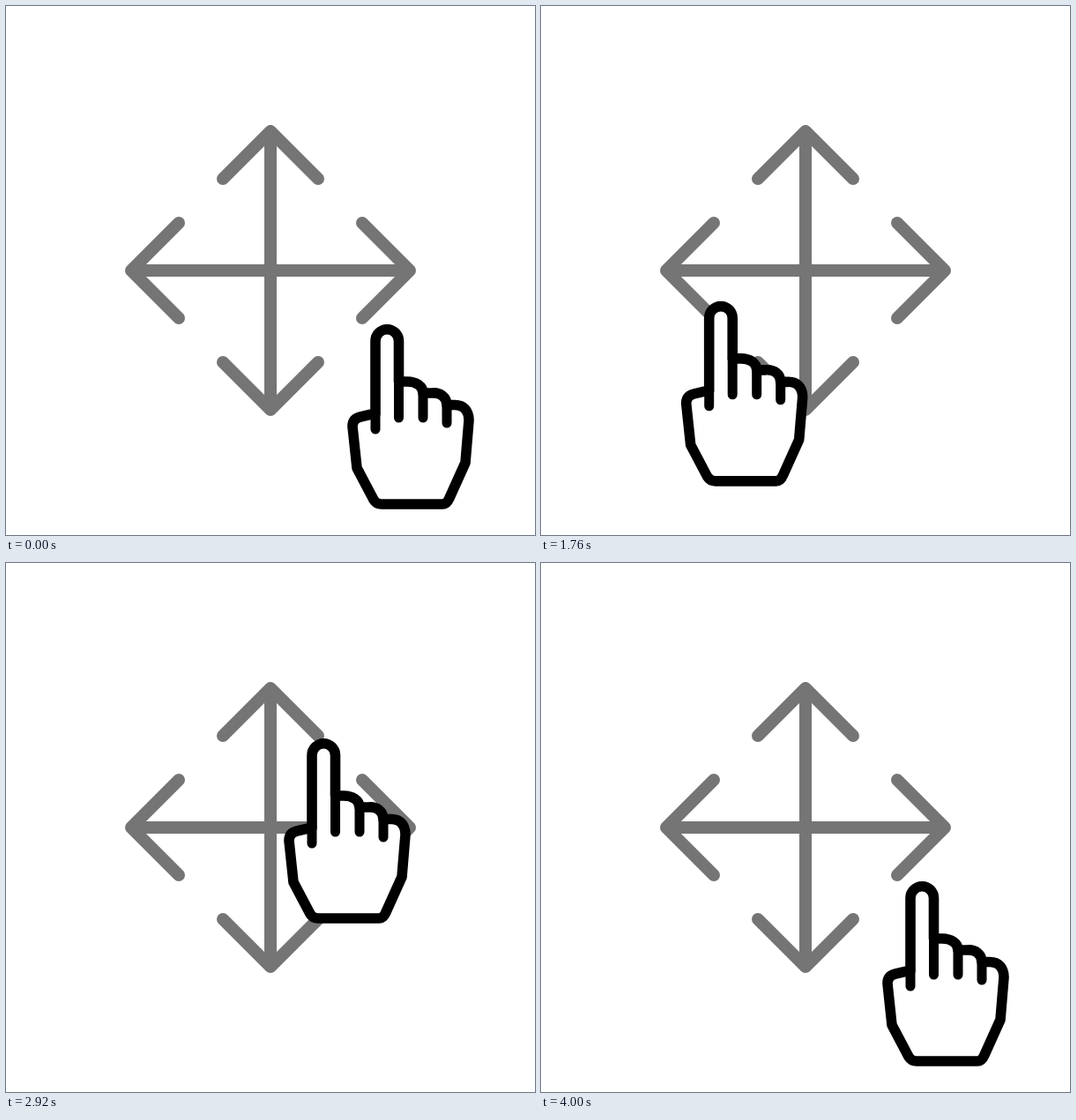
An HTML page with a canvas for the animation above (4.2 s loop, 600x600 px).

```html
<!DOCTYPE html>
<html lang="en">
<head>
<meta charset="utf-8">
<title>Move in any direction</title>
<style>
  html, body { margin: 0; width: 100%; height: 100%; overflow: hidden; background: #fff; }
  canvas { display: block; width: 600px; height: 600px; }
</style>
</head>
<body>
<canvas id="stage" width="600" height="600"></canvas>
<script>
const ctx = document.getElementById('stage').getContext('2d');
const LOOP = 4200, STEP = 40, LAST = 100;

// Fingertip path: [step, x, y]
const knots = [
  [0, 432, 361], [7, 428, 351.3], [14, 411, 327], [16, 403, 320],
  [21, 377, 308.5], [28, 329, 305], [32, 300, 311], [37, 261, 324],
  [42, 221, 334], [47, 180, 328.5], [52, 159.3, 283], [56, 164.5, 242],
  [60, 197.2, 208.8], [65, 258.5, 187.2], [70, 324, 189], [73, 360, 199],
  [78, 408.5, 227], [84, 443, 276], [87, 446, 302], [89, 445.5, 318],
  [93, 440, 343.2], [98, 433, 359], [100, 432, 361]
];

// Velocity at a knot, from the parabola through its neighbours
function slope(i, k) {
  if (i === 0 || i === knots.length - 1) return 0;
  const [a, b, c] = [knots[i - 1], knots[i], knots[i + 1]];
  const h0 = b[0] - a[0], h1 = c[0] - b[0];
  const d0 = (b[k] - a[k]) / h0, d1 = (c[k] - b[k]) / h1;
  return (d0 * h1 + d1 * h0) / (h0 + h1);
}

function tipAt(n) {
  let i = 0;
  while (i < knots.length - 2 && n >= knots[i + 1][0]) i++;
  const p = knots[i], q = knots[i + 1], h = q[0] - p[0];
  const u = (n - p[0]) / h, w = 1 - u;
  return [1, 2].map(k =>
    p[k] * (1 + 2 * u) * w * w + slope(i, k) * h * u * w * w +
    q[k] * u * u * (3 - 2 * u) - slope(i + 1, k) * h * u * u * w);
}

// Hand drawn with its fingertip at (432, 361)
const hand = new Path2D(
  'M419 462 V380 A13.2 13.2 0 0 1 445.5 380 V426 ' +
  'H455 C465 426 473 431 473 439 H483 C493 438 500 444 500 452.5 ' +
  'H508 C519 452 525 459 525 470 L521 518 L502.5 559 Q500 565 495 565 ' +
  'H426 Q420 565 417 560 L398 524 L393 477 Q393 468 402 466 Z');
const creases = new Path2D('M419 462 V480 M445.5 426 V467 M473 439 V467 M500 452 V473');

const arrow = new Path2D('M300 300 V142 M246 196 L300 142 L354 196');

function drawArrows() {
  ctx.strokeStyle = '#757575';
  ctx.lineWidth = 14;
  for (let i = 0; i < 4; i++) {
    ctx.save();
    ctx.translate(300, 300);
    ctx.rotate(i * Math.PI / 2);
    ctx.translate(-300, -300);
    ctx.stroke(arrow);
    ctx.restore();
  }
}

function drawHand(x, y) {
  ctx.save();
  ctx.translate(x - 432, y - 361);
  ctx.fillStyle = '#fff';
  ctx.strokeStyle = '#000';
  ctx.lineWidth = 11.6;
  ctx.fill(hand);
  ctx.stroke(hand);
  ctx.lineWidth = 11;
  ctx.stroke(creases);
  ctx.restore();
}

function draw(ms) {
  const n = Math.min(LAST, Math.floor(ms % LOOP / STEP));
  ctx.fillStyle = '#fff';
  ctx.fillRect(0, 0, 600, 600);
  ctx.lineCap = ctx.lineJoin = 'round';
  drawArrows();
  drawHand(...tipAt(n));
}

let start;
function tick(now) {
  if (start === undefined) start = now;
  draw(now - start);
  requestAnimationFrame(tick);
}
draw(0);
requestAnimationFrame(tick);
</script>
</body>
</html>
```
